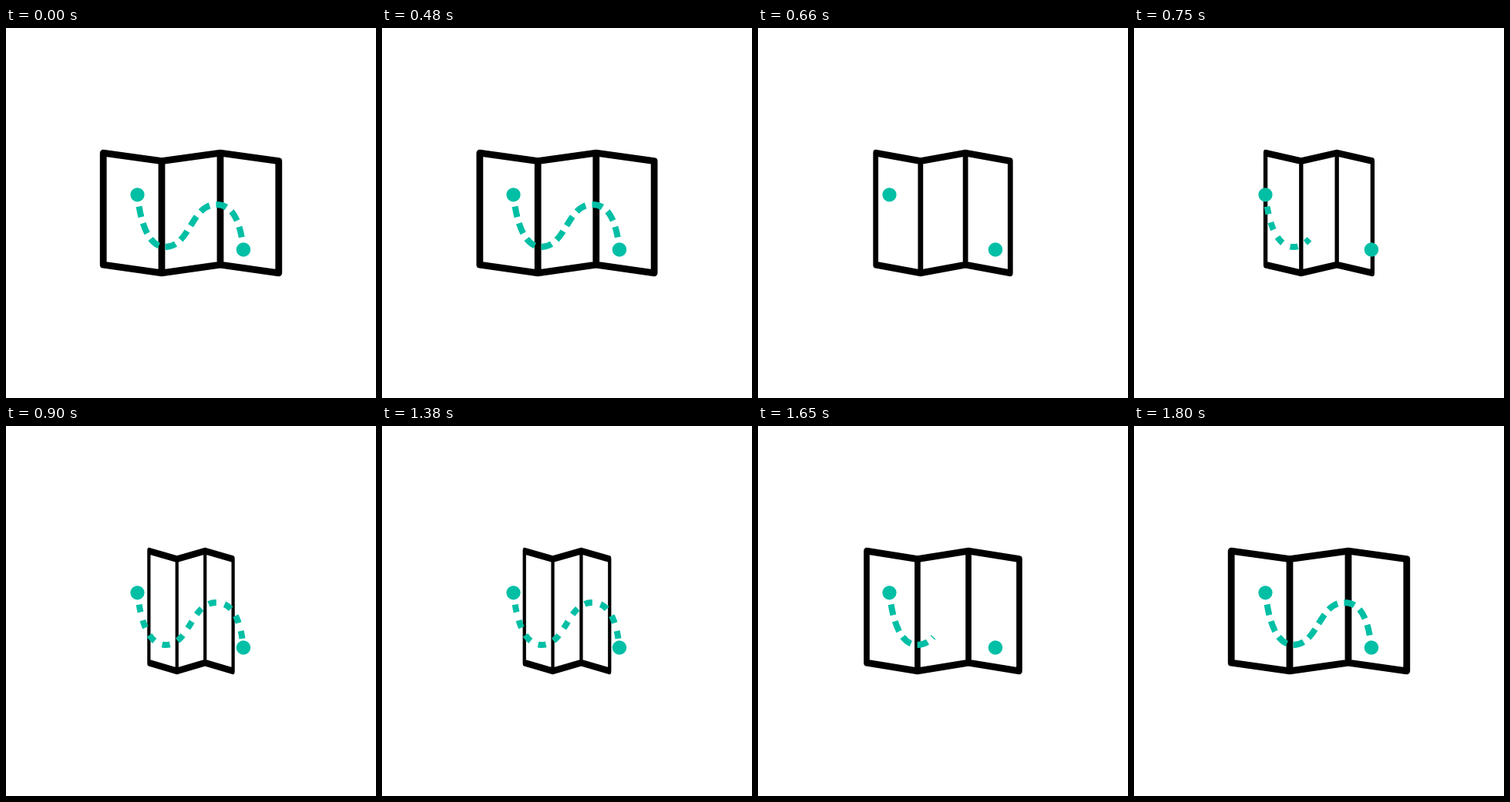
Animation of 480 by 480 pixels, one loop 2280 ms. Source, as an HTML page without scripts:

```html
<!DOCTYPE html>
<html lang="en">
<head>
<meta charset="utf-8">
<title>Folding map</title>
<style>
  @property --p {
    syntax: "<number>";
    inherits: true;
    initial-value: 0;
  }
  html, body {
    margin: 0;
    width: 100%;
    height: 100%;
    overflow: hidden;
    background: #fff;
  }
  /* --p counts folds (0 to 2), --e is the eased amount folded (0 open, 1 closed) */
  svg {
    display: block;
    width: 100%;
    height: 100%;
    fill: none;
    --e: calc(.5 - .5 * cos(var(--p) * 180deg));
    animation: fold 2280ms infinite;
  }
  @keyframes fold {
    0% { --p: 0; }
    19.693% { --p: 0; animation-timing-function: steps(15, end); }
    39.43% { --p: 1; }
    59.167% { --p: 1; animation-timing-function: steps(15, end); }
    78.904%, 100% { --p: 2; }
  }
  .map {
    stroke: #000;
    stroke-width: 8.8;
    stroke-linejoin: round;
    stroke-linecap: round;
    transform-origin: 240px 240px;
    transform: scaleX(calc(1 - .52 * var(--e)));
  }
  .route { stroke: #00bfa5; stroke-width: 8; }
  .open { stroke-dasharray: 7.5 4.5; stroke-dashoffset: 3.75px; }
  .closed { stroke-dasharray: 5.4 5.84; stroke-dashoffset: 2.9px; }

  /* The route retracts to its start, then grows back with the other dashes */
  .reveal { stroke: #fff; stroke-width: 14; stroke-dasharray: 132 264; }
  .out { stroke-dashoffset: calc(132px * clamp(0, var(--e) / .44, 1)); }
  .in { stroke-dashoffset: calc(132px * clamp(0, (1 - var(--e)) / .44, 1)); }
  .dots { fill: #00bfa5; }
</style>
</head>
<body>
<svg viewBox="0 0 480 480">
  <defs>
    <path id="curve" pathLength="132" d="M170.5 216C174 250 184 284 206.5 284C239 284 240 229 272.5 229C294 229 304 250 308 287"/>
    <mask id="out" maskUnits="userSpaceOnUse" x="0" y="0" width="480" height="480">
      <use href="#curve" class="reveal out"/>
    </mask>
    <mask id="in" maskUnits="userSpaceOnUse" x="0" y="0" width="480" height="480">
      <use href="#curve" class="reveal in"/>
    </mask>
  </defs>
  <path class="map" d="M126.2 162.2L202 172.7L278 162.2L353.8 172.7V317.8L278 307.2L202 317.8L126.2 307.2ZM202 172.7V317.8M278 162.2V307.2"/>
  <g mask="url(#out)"><use href="#curve" class="route open"/></g>
  <g mask="url(#in)"><use href="#curve" class="route closed"/></g>
  <g class="dots">
    <circle cx="170.5" cy="216.3" r="9.1"/>
    <circle cx="308" cy="287.5" r="9.3"/>
  </g>
</svg>
</body>
</html>
```
